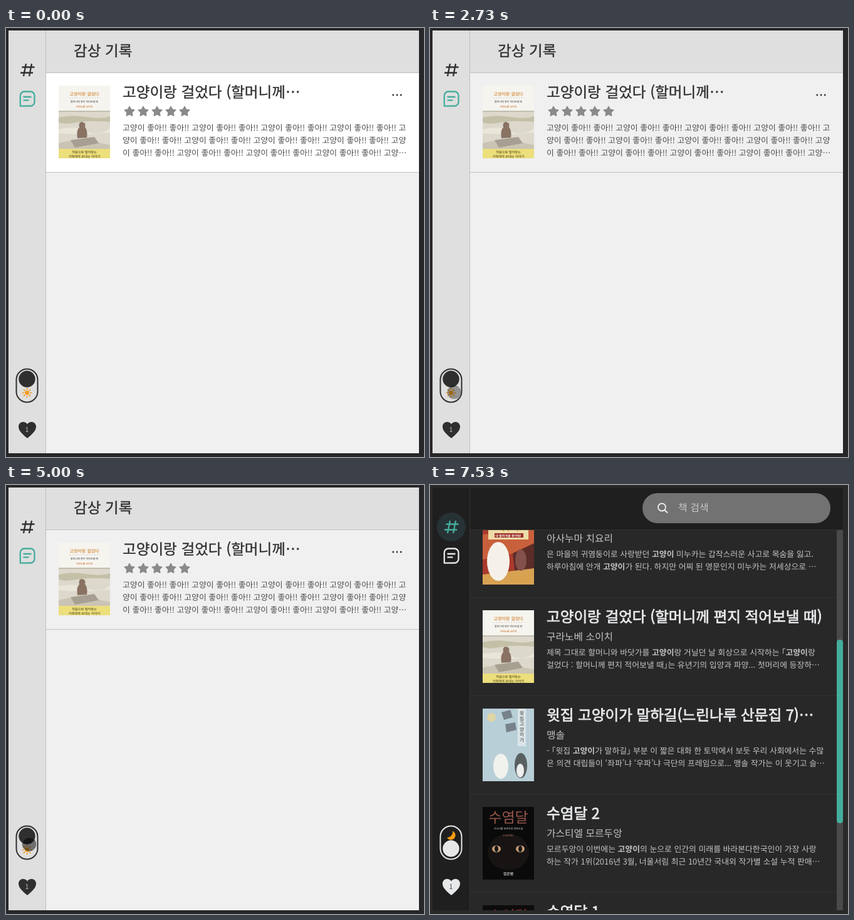
These frames come from a looping animation (667x685 px, 7.66 s). An HTML page:

```html
<!DOCTYPE html>
<html lang="ko">
<head>
<meta charset="utf-8">
<title>감상 기록</title>
<style>
html,body{margin:0;width:100%;height:100%;overflow:hidden;background:#282828}
svg{display:block;width:667px;height:685px;text-rendering:geometricPrecision;
  font-family:'Noto Sans CJK KR','Noto Sans CJK','Noto Sans CJK JP',sans-serif;
  --frame:#272629;--bar:#dfdfdf;--bg:#f0f0f0;--line:#c0c0c0;--ink:#2f2f2f;--sub:#4c4c4c;--star:#8a8a8a;--heavy:.35px}
svg.dark{--frame:#292929;--bar:#1f1f1f;--bg:#282828;--line:#323232;--ink:#e6e8ea;--sub:#c4c4c4;--star:#8c8c8c;--heavy:.8px}
.bar{fill:var(--bar)}.bg{fill:var(--bg)}.line{fill:var(--line)}.ink{fill:var(--ink)}
.h{font-size:23.6px;fill:var(--ink);stroke:var(--ink);stroke-width:var(--heavy)}
.by{font-size:15.8px;font-weight:300;fill:var(--sub)}
.p{font-size:12.85px;font-weight:300;fill:var(--sub)}
.p tspan{font-weight:600}
.ico{fill:none;stroke-width:2.3;stroke-linejoin:round}
</style>
</head>
<body>
<svg id="app" viewBox="0 0 667 685" lang="ko"></svg>
<script>
const LOOP = 7660, TEAL = '#45ad9d';
const app = document.getElementById('app');

// ---- markup helpers ----
const rect = (x, y, w, h, a = '') => `<rect x="${x}" y="${y}" width="${w}" height="${h}" ${a}/>`;
const oval = (x, y, rx, ry, fill) => `<ellipse cx="${x}" cy="${y}" rx="${rx}" ry="${ry}" fill="${fill}"/>`;
const dot = (x, y, r, a = '') => `<circle cx="${x}" cy="${y}" r="${r}" ${a}/>`;
const path = (d, a = '') => `<path d="${d}" ${a}/>`;
const group = (s, a = '') => `<g ${a}>${s}</g>`;
const text = (x, y, s, cls, a = '') =>
  `<text x="${x}" y="${y}" class="${cls}" ${a}>${s.replace(/\*(.+?)\*/g, '<tspan>$1</tspan>')}</text>`;
const label = (y, s, size, fill, weight = 700) =>
  text(41, y, s, '', `text-anchor="middle" font-size="${size}" font-weight="${weight}" fill="${fill}"`);

function star(cx, cy, r) {
  let d = '';
  for (let i = 0; i < 10; i++) {
    const a = i * Math.PI / 5 - Math.PI / 2, k = i % 2 ? r * .52 : r;
    d += (i ? 'L' : 'M') + (cx + k * Math.cos(a)).toFixed(2) + ' ' + (cy + k * Math.sin(a)).toFixed(2);
  }
  return path(d + 'z', 'fill="var(--star)" stroke="var(--star)" stroke-width="1.4" stroke-linejoin="round"');
}

// ---- book covers, 82 x 116 ----
const covers = {
  green: () => rect(0, 0, 82, 116, 'fill="#a5cb3f"') +
    path('M0 116V62L12 60Q41 50 70 60L82 62V116Z', 'fill="#77797b"') +
    path('M14 58C0 46 6 24 22 24C30 17 52 17 60 24C76 24 82 46 68 58Q41 50 14 58Z', 'fill="#fafafa"') +
    rect(18, 42, 47, 5, 'fill="#e2692f"') +
    label(14, '고양이 우체부', 10.5, '#d33a2c') + label(38, '솜떡', 19, '#222') +
    oval(41, 107, 29, 13, '#ececec'),
  red: () => rect(0, 0, 82, 116, 'fill="#e04b38"') +
    path('M0 98V76L6 48L24 60Q41 55 58 60L76 48L82 76V98Z', 'fill="#6d6f72"') + oval(41, 93, 26, 11, '#ececec') +
    label(14, '고양이 우체부', 10, '#fff') + label(34, '솜떡', 18, '#222') +
    rect(16, 39, 50, 5, 'fill="#e9b03a"') + rect(0, 97, 82, 19, 'fill="#ecb3a6"') +
    label(104, '어린이 동화 당선작', 5.5, '#5b2a24') + label(113, '매력 만점 우체부 이야기', 6.5, '#b52a20'),
  ghost: () => rect(0, 0, 82, 116, 'fill="#a93a2c"') +
    path('M0 36L82 28V60L0 76Z', 'fill="#c9603c"') + path('M48 66L82 50V96L52 100Z', 'fill="#5c2d28"') +
    rect(9, 3, 64, 41, 'fill="#efdba8"') + path('M0 100L82 90V116H0Z', 'fill="#d8a253"') +
    label(16, '안개 고양이', 10.5, '#2d2320') + label(30, '미누카', 13, '#e4a129') +
    rect(19, 34, 46, 7, 'fill="#9c2f27"') + label(40, '내 발자국을 찾아줘!', 5, '#fff') +
    oval(25, 79, 18, 31, '#f5f1ea') + oval(61, 77, 9, 17, '#84504a'),
  beach: () => rect(0, 0, 82, 116, 'fill="#f6f4ef"') +
    rect(0, 41, 82, 61, 'fill="#dcd8cb"') + rect(0, 40, 82, 2, 'fill="#c3bfb0"') +
    path('M0 51Q20 46 44 50T82 49V58Q50 55 28 59T0 58Z', 'fill="#c4c0a8"') +
    path('M0 70Q26 64 46 73T82 68V75Q42 80 0 76Z', 'fill="#e9e5d9"') +
    path('M0 92Q30 82 82 95V102H0Z', 'fill="#cac4b4"') +
    path('M19 87L57 82L64 92L26 99Z', 'fill="#a7a092"') +
    path('M30 84Q28 70 33 67Q31 58 37.5 58Q44 59 42 66Q47 72 45 83Z', 'fill="#8a7263"') +
    label(16, '고양이랑 걸었다', 7, '#d89a55') +
    path('M17 19.5H66', 'stroke="#d9d3c6" stroke-width="1" stroke-dasharray="2 2"') +
    label(27, '할머니께 편지 적어보낼 때', 4, '#777') + label(35, '구라노베 소이치', 4, '#d38a4d') +
    rect(0, 101, 82, 15, 'fill="#ecdf7c"') +
    label(108, '처음으로 털어놓는', 5.2, '#7a6d31') + label(114.5, '가족에게 보내는 이야기', 5.2, '#7a6d31'),
  blue: () => rect(0, 0, 82, 116, 'fill="#b8cfd8"') +
    dot(14, 14, 7, 'fill="#dfd6a4"') + path('M30 6L44 2L48 14L34 18Z M36 25L52 22L54 34L38 38Z', 'fill="#77828a"') +
    rect(56, 0, 13, 60, 'fill="#dbe5e8"') +
    [...'윗집고양이가'].map((c, i) => text(59, 10 + i * 8.5, c, '', 'font-size="7.5" fill="#333"')).join('') +
    oval(29, 92, 12, 20, '#f1f1ed') + oval(61, 91, 10, 20, '#5a5f62') + oval(60, 99, 6, 11, '#eee'),
  night: () => rect(0, 0, 82, 116, 'fill="#0b0a0b"') + oval(41, 72, 33, 29, '#171413') +
    label(25, '수염달', 23, '#96564b', 300) + label(36, '가스티엘 모르두앙 장편소설', 4, '#999') +
    label(47, 'A NOVEL', 4, '#8d5048') +
    oval(22, 67, 7, 5.5, '#c99d78') + oval(60, 67, 7, 5.5, '#c99d78') +
    oval(22, 67, 3, 5, '#151515') + oval(60, 67, 3, 5, '#151515') +
    label(109, '검은밤', 6, '#ccc'),
  dusk: () => rect(0, 0, 82, 116, 'fill="#0d0b0b"') + label(25, '수염달', 23, '#a33a30', 300)
};
const cover = (name, y) => group(covers[name](), `transform="translate(84 ${y})" clip-path="url(#cut)"`);

const books = [
  ['green', '고양이 우체부 솜떡 2 (노을빛 엽서에…', '표하녹',
    '화제의 베스트셀러 ‘*고양이* 우체부 솜떡’ 시리즈 두 번째 이야기로 돌아오다! “어서',
    '오세요. *고양이* 배달부 솜떡입니다.” ... 받은 ｢*고양이* 우체부 솜떡｣의 후속작이 출…'],
  ['red', '고양이 우체부 솜떡 1 (언덕길 소포를…', '표하녹',
    '매력 만점 *고양이* 우체부가 나타났다제24회 늘담 ‘맑은 새싹글빛’ 원고 공모 동화 부',
    '문 대상 수상작이자, 새로운 시리즈의 시작을 알리는 ｢*고양이* 우체부 솜떡｣이 출간…'],
  ['ghost', '안개 고양이 미누카 1 (내 발자국을 찾아줘!)', '아사누마 치요리',
    '은 마을의 귀염둥이로 사랑받던 *고양이* 미누카는 갑작스러운 사고로 목숨을 잃고.',
    '하루아침에 안개 *고양이*가 된다. 하지만 어찌 된 영문인지 미누카는 저세상으로 …'],
  ['beach', '고양이랑 걸었다 (할머니께 편지 적어보낼 때)', '구라노베 소이치',
    '제목 그대로 할머니와 바닷가를 *고양이*랑 거닐던 날 회상으로 시작하는 ｢*고양이*랑',
    '걸었다 : 할머니께 편지 적어보낼 때｣는 유년기의 입양과 파양... 첫머리에 등장하…'],
  ['blue', '윗집 고양이가 말하길(느린나루 산문집 7)…', '맹솔',
    '- ｢윗집 *고양이*가 말하길｣ 부분 이 짧은 대화 한 토막에서 보듯 우리 사회에서는 수많',
    '은 의견 대립들이 ‘좌파’냐 ‘우파’냐 극단의 프레임으로... 맹솔 작가는 이 웃기고 슬…'],
  ['night', '수염달 2', '가스티엘 모르두앙',
    '모르두앙이 이번에는 *고양이*의 눈으로 인간의 미래를 바라본다한국인이 가장 사랑',
    '하는 작가 1위(2016년 3월, 너울서림 최근 10년간 국내외 작가별 소설 누적 판매…'],
  ['dusk', '수염달 1', '가스티엘 모르두앙', '', '']
];
const book = ([art, title, by, a, b], i) => {
  const y = 72 + i * 157;
  return cover(art, y + 20) + text(186, y + 39, title, 'h') + text(186, y + 68, by, 'by') +
    text(186, y + 92, a, 'p') + text(186, y + 112, b, 'p') + rect(64, y + 156, 585, 1, 'class="line"');
};

// ---- pages ----
const cry = ' 좋아!! 좋아!! ', cat = '고양이' + cry;
const notes = rect(64, 72, 595, 158, 'id="card" fill="#fff"') +
  text(108, 45, '감상 기록', 'h') + cover('beach', 92) + text(186, 111, '고양이랑 걸었다 (할머니께…', 'h') +
  [0, 1, 2, 3, 4].map(i => star(197 + 22 * i, 133.5, 8.2)).join('') +
  text(186, 164, cat.repeat(4) + '고', 'p') +
  text(186, 184, '양이' + cry + cat.repeat(3) + '고양', 'p') +
  text(186, 204, '이' + cry + cat.repeat(3) + '고양…', 'p') +
  [617.8, 624, 630.2].map(x => dot(x, 107, 1.4, 'class="ink"')).join('') +
  rect(64, 230, 595, 1, 'class="line"');

const search = group(group(books.map(book).join(''), 'id="list"'), 'clip-path="url(#view)"') +
  rect(339, 13, 300, 48, 'rx="24" fill="#727272"') +
  dot(370, 35.5, 6, 'fill="none" stroke="#eee" stroke-width="1.8"') +
  path('M374.5 40L379 44.5', 'stroke="#eee" stroke-width="2"') +
  text(396, 42, '책 검색', '', 'font-size="16" fill="#c6c6c6"') +
  rect(649, 72, 10, 607, 'fill="#4a4a4a"') + rect(649, 72, 10, 293, `id="thumb" rx="4.5" fill="${TEAL}"`);

// ---- sidebar ----
let rays = '';
for (let i = 0; i < 8; i++) rays += `<path d="M33.5 577.3V575.3" transform="rotate(${i * 45} 33.5 582.5)"/>`;
const side = dot(34, 67, 23, 'id="halo"') +
  path('M25.5 62.5H45.5M23 71.5H43M32 57L28 77M41 57L37 77', 'id="hash" class="ico"') +
  path('M22.8 124.6V108a6.5 6.5 0 0 1 6.5-6.5H39a6.5 6.5 0 0 1 6.5 6.5V118a6.5 6.5 0 0 1-6.5 6.5ZM27.5 110H40.5M27.5 115.3H36.5',
    'id="memo" class="ico"') +
  path('M36 552.5a7.3 7.3 0 1 1-9 10.5a9 9 0 0 0 9-10.5z', 'fill="#f79a10"') +
  dot(33.5, 582.5, 3.4, 'fill="#f39c1b"') + group(rays, 'stroke="#f39c1b" stroke-width="1.6" stroke-linecap="round"') +
  rect(16.5, 544.5, 34, 53, 'id="pill" rx="17" fill="none" stroke-width="2"') +
  dot(33.5, 560.5, 13.2, 'id="knob"') +
  rect(15, 544, 37, 55, 'id="tap" fill="#33b5e5"') +
  path('M34 655C24 647 20 642 20 636.5C20 632 23.4 629 27.3 629c2.7 0 5.2 1.3 6.7 3.5c1.5-2.2 4-3.5 6.7-3.5C44.6 629 48 632 48 636.5C48 642 44 647 34 655z', 'class="ink"') +
  text(33.5, 645, '1', 'bar', 'font-size="10.5" font-weight="300" text-anchor="middle" opacity=".8"');

app.innerHTML = '<defs><clipPath id="cut">' + rect(0, 0, 82, 116) + '</clipPath><clipPath id="view">' +
  rect(64, 72, 585, 607) + '</clipPath></defs>' +
  rect(0, 0, 667, 685, 'fill="var(--frame)"') + rect(4, 4, 655, 675, 'class="bg"') +
  rect(64, 4, 595, 67, 'class="bar"') + rect(64, 71, 595, 1, 'class="line"') +
  group(notes, 'id="notes"') + group(search, 'id="search"') +
  rect(4, 4, 59, 675, 'class="bar"') + rect(63, 4, 1, 675, 'class="line"') + side +
  dot(0, 0, 11, 'id="touch"');

// ---- motion ----
const el = id => document.getElementById(id);
const set = (id, o) => { for (const k in o) el(id).setAttribute(k, o[k]); };
const clamp = x => Math.max(0, Math.min(1, x));
const within = (t, [a, b]) => t >= a && t < b;

const flips = [1070, 1930, 2930, 3600, 5130];
const presses = [[1070, 1130], [1670, 1730], [2670, 2730], [4470, 4530], [5000, 5130], [5800, 5930], [6930, 7070]];
// each trail: start, end, then [time, x, y] stops
const trails = [
  [200, 3270, [200, 82.5, 628.5], [600, 41.5, 585.5], [1070, 38.5, 581.5]],
  [3670, 5000, [3670, 38, 582], [3800, 30, 669], [4000, 12, 330], [4130, 22, 16], [4200, 34.5, 72.5]],
  [5000, 6530, [5000, 37, 573.5], [5400, 37, 573.5], [5730, 40.5, 76.5]],
  [6930, 7070, [6930, 277.5, 474.5]]
];

function touchAt(t) {
  const trail = trails.find(r => within(t, r));
  if (!trail) return null;
  const stops = trail.slice(2);
  let i = 0;
  while (i < stops.length - 1 && t >= stops[i + 1][0]) i++;
  const a = stops[i], b = stops[i + 1] || a;
  const k = a === b ? 0 : (t - a[0]) / (b[0] - a[0]);
  return [a[1] + (b[1] - a[1]) * k, a[2] + (b[2] - a[2]) * k];
}

function draw(t) {
  const past = flips.filter(f => t >= f), dark = past.length % 2 === 1;
  const since = past.length ? t - past[past.length - 1] : 1e4;
  const p = Math.sin(clamp((since + 65) / 330) * Math.PI / 2);
  const night = dark ? p : 1 - p;
  const c = Math.round(47 + 184 * night), shade = `rgb(${c},${c},${c})`;
  app.setAttribute('class', dark ? 'dark' : '');
  set('knob', { cy: 560.5 + 20 * night, fill: shade });
  set('pill', { stroke: shade });
  set('tap', { opacity: .42 * clamp(1 - (since - 60) / 200) });
  set('card', { opacity: t < 1070 ? 1 : 0 });

  const found = t >= 6130;
  set('notes', { display: found ? 'none' : 'inline' });
  set('search', { display: found ? 'inline' : 'none' });
  set('hash', { stroke: found ? TEAL : 'var(--ink)' });
  set('memo', { stroke: found ? 'var(--ink)' : TEAL });
  set('halo', { fill: '#5fb0c8', opacity: found ? .13 + .25 * clamp((6330 - t) / 130) : 0 });

  const x = t < 7070 ? 0 : clamp((t - 7010) / 520);
  const scroll = 363 * x * x * (3 - 2 * x);
  set('list', { transform: `translate(0 ${-scroll})` });
  set('thumb', { y: 72 + scroll * 175 / 363 });

  const at = touchAt(t), down = presses.some(r => within(t, r));
  set('touch', {
    display: at ? 'inline' : 'none', cx: at ? at[0] : 0, cy: at ? at[1] : 0,
    fill: down ? 'rgba(0,0,0,.5)' : 'rgba(0,0,0,.34)',
    stroke: down ? 'rgba(90,90,90,.5)' : 'none'
  });
}

const start = performance.now();
function tick() {
  draw((performance.now() - start) % LOOP);
  requestAnimationFrame(tick);
}
tick();
</script>
</body>
</html>
```
